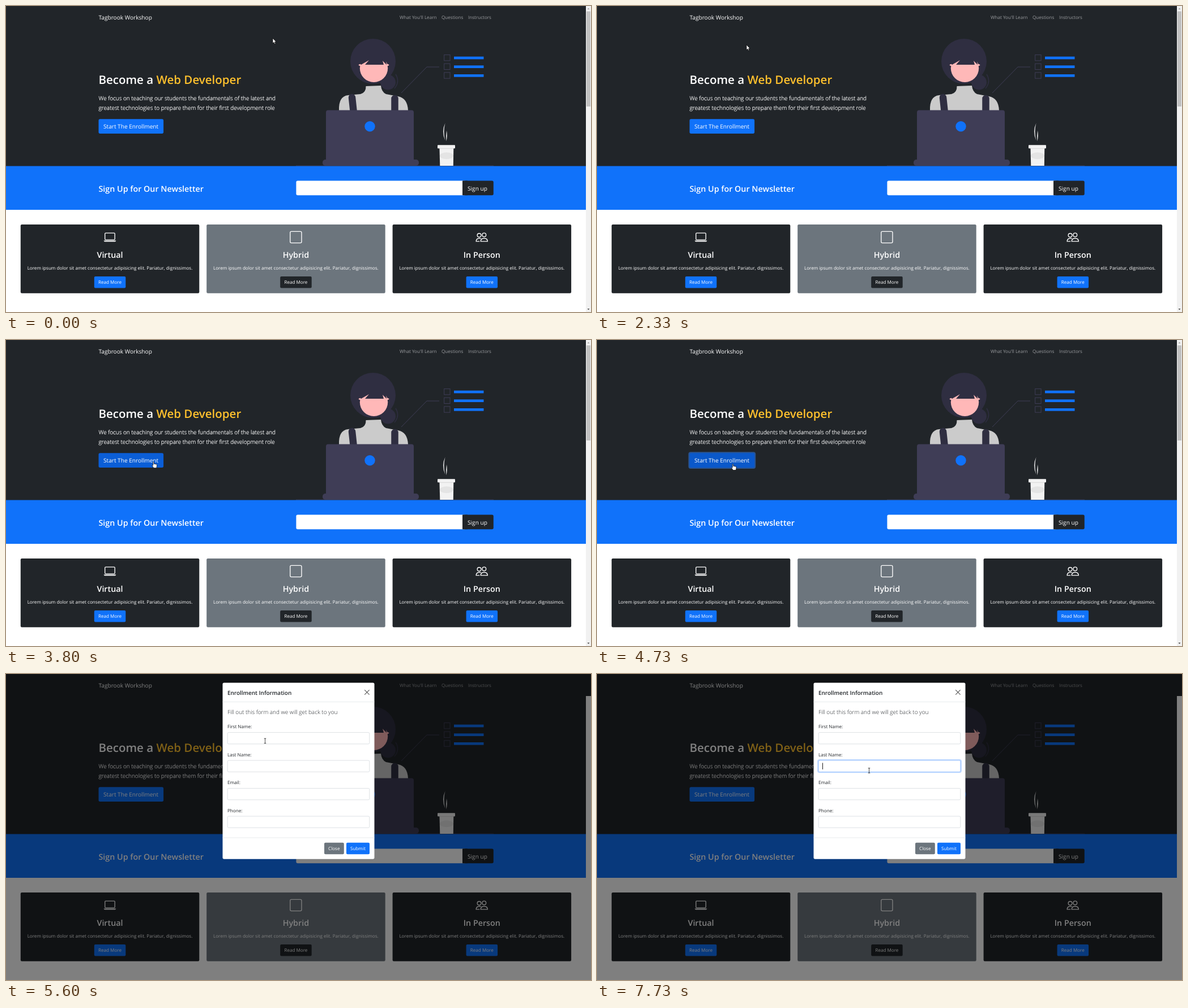
An HTML page for the animation above (8 s loop, 1033 by 542 pixels).

```html
<!DOCTYPE html>
<html lang="en">
<head>
<meta charset="utf-8">
<title>Enrollment page</title>
<style>
  html, body { margin: 0; width: 100%; height: 100%; overflow: hidden; background: #fff; }
  svg { display: block; width: 1033px; height: 542px; font: 8.1px "Open Sans", "Noto Sans", sans-serif; text-rendering: geometricPrecision; }
  .dark { fill: #212529; }
  .blue { fill: #1072fa; }
  .gray { fill: #6c757d; }
  .white { fill: #fff; }
  .navy { fill: #2f2e41; }
  .slate { fill: #3f3d56; }
  .line { fill: none; stroke: #3f3d56; }
  .h1 { font-size: 20.5px; font-weight: 600; }
  .h3 { font-size: 14.3px; font-weight: 600; }
  .h5 { font-size: 9.95px; font-weight: 600; }
  .lead { font-size: 9.98px; font-weight: 300; }
  .bright { stroke: #fff; stroke-width: .2; }
  .large { font-size: 10.13px; }
  .mid { text-anchor: middle; }
  .icon { fill: none; stroke: #fff; }
</style>
</head>
<body>
<svg viewBox="0 0 1033 542">
  <rect class="white" width="1033" height="542"/>
  <rect class="dark" width="1033" height="39"/>
  <rect class="dark" width="1024" height="284"/>
  <text class="white large" x="163.5" y="23.7">Tagbrook Workshop</text>
  <g fill="#9b9da0">
    <text x="695" y="22.6">What You'll Learn</text>
    <text x="769" y="22.6">Questions</text>
    <text x="816" y="22.6">Instructors</text>
  </g>

  <text class="white h1" x="163.5" y="138">Become a <tspan fill="#ffc12d">Web Developer</tspan></text>
  <g class="white lead bright">
    <text x="163.5" y="167.3">We focus on teaching our students the fundamentals of the latest and</text>
    <text x="163.5" y="183.7">greatest technologies to prepare them for their first development role</text>
  </g>
  <rect id="ring" x="161.4" y="198.2" width="118.8" height="29.8" rx="4" fill="#3184fd" opacity=".5"/>
  <rect id="enroll" x="163.5" y="200.3" width="114.6" height="25.6" rx="2.6"/>
  <text class="white large" x="172" y="217.3">Start The Enrollment</text>

  <!-- illustration -->
  <path class="line" d="M512 283H861M698 154L743 108H765"/>
  <circle class="navy" cx="648" cy="98" r="40"/>
  <circle class="navy" cx="674.5" cy="135" r="13.5"/>
  <path d="M688 121Q696 134 686 146" fill="none" stroke="#2f2e41" stroke-width="1.6"/>
  <g fill="#ffb8b8">
    <circle cx="649.5" cy="110.3" r="24.7"/>
    <ellipse cx="649.5" cy="104.5" rx="27" ry="4"/>
  </g>
  <path class="navy" d="M624 101V84H675V102L671 96 672 104 665 97 667 104H634L641 96 627 104Z"/>
  <path fill="#cbcbcb" d="M588 185Q587 160 604 158L626 156Q636 153 635.5 142L662 141Q663 152 671 156L692 160Q709 163 710 185Z"/>
  <path d="M611 162L614 190M686.5 164V190" stroke="#2f2e41" stroke-width="12.5" stroke-linecap="round"/>
  <rect class="slate" x="565" y="184.5" width="155" height="98" rx="4"/>
  <rect class="slate" x="559" y="272" width="170" height="11" rx="5"/>
  <circle class="blue" cx="642.5" cy="213.3" r="9.2"/>
  <g id="tasks"></g>
  <g fill="#f2f2f2">
    <rect x="762" y="246.3" width="31" height="6" rx="1"/>
    <path d="M765.5 252H790.3L789.8 283H766.3Z"/>
    <path d="M775.5 207.5Q768.5 222 775.3 238Q771.5 222 775.5 207.5ZM778 220.5Q779.8 230 777.5 239.5Q776.5 230 778 220.5Z"/>
  </g>
  <path d="M765.5 252.5H790.3" stroke="#ccc" stroke-width=".6"/>
  <ellipse cx="778" cy="265.2" rx="12" ry="6" fill="#e4e4e4"/>

  <!-- newsletter -->
  <rect class="blue" y="283.5" width="1024" height="77.5"/>
  <text class="white h3" x="163.5" y="328.7">Sign Up for Our Newsletter</text>
  <rect class="white" x="512.4" y="309.5" width="300" height="25.7" rx="2.6"/>
  <rect class="dark" x="806" y="309.5" width="54.8" height="25.7" rx="2.6"/>
  <rect class="dark" x="806" y="309.5" width="9" height="25.7"/>
  <text class="white large" x="815" y="326.8">Sign up</text>

  <g id="cards"></g>

  <g id="scrollbar">
    <rect x="1024" width="9" height="542" fill="#f1f1f1"/>
    <rect x="1025" y="9.5" width="7" height="168.5" fill="#c1c1c1"/>
    <path d="M1026.5 6l2-2.5 2 2.5Z" fill="#a3a3a3"/>
    <path d="M1026.5 536l2 2.5 2-2.5Z" fill="#505050"/>
  </g>

  <g id="modal">
    <rect width="1033" height="542" opacity=".5"/>
    <rect class="white" x="382.5" y="15.5" width="268" height="312.2" rx="2.6"/>
    <path d="M382.5 49.4h268M382.5 290h268" stroke="#dee2e6" stroke-width=".7"/>
    <text class="dark h5" x="391" y="36.5">Enrollment Information</text>
    <path d="M633.2 28.2l8.4 8.4m0-8.4l-8.4 8.4" stroke="#555" stroke-width="1.1"/>
    <text class="dark lead" x="391" y="70.7">Fill out this form and we will get back to you</text>
    <g id="fields"></g>
    <rect id="caret" x="398" width=".9" height="11.5"/>
    <rect class="gray" x="562" y="298.7" width="34.8" height="20.6" rx="2.1"/>
    <rect class="blue" x="601" y="298.7" width="41" height="20.6" rx="2.1"/>
    <text class="white mid" x="579.3" y="312">Close</text>
    <text class="white mid" x="621.4" y="312">Submit</text>
  </g>

  <g id="cursor" stroke="#000" stroke-width=".7" fill="#fff">
    <path id="arrow" d="M0 0V9.2L2 7.3 3.5 10.3 5 9.7 3.5 6.7H6.2Z"/>
    <path id="hand" d="M-.8 1Q0-.5 .8 1V4.3L5 5Q6 5 6 6.5 6 10 5 11.6H.3L-2.4 7.5Q-2.5 6-.8 7Z"/>
    <path id="beam" d="M-1.8-4.3H1.8M0-4.3V4.3M-1.8 4.3H1.8"/>
  </g>
</svg>
<script>
const $ = id => document.getElementById(id);
const show = (id, on) => { $(id).style.display = on ? '' : 'none'; };
const repeat = (count, make) => Array.from({ length: count }, (_, i) => make(i)).join('');

$('tasks').innerHTML = repeat(3, i => `
  <rect class="line" x="773.7" y="${86.4 + i * 15.7}" width="10.4" height="10.4"/>
  <rect class="blue" x="791" y="${89.6 + i * 15.7}" width="52.5" height="4.7"/>`);

const cards = [
  ['Virtual', '<rect x="1.5" y="2.5" width="13" height="9" rx="1"/><path d="M0 12.5H16Q16 14 14.5 14H1.5Q0 14 0 12.5Z" fill="#fff" stroke="none"/>'],
  ['Hybrid', '<rect x=".5" y=".5" width="15" height="15" rx="1.5"/>'],
  ['In Person', `<circle cx="11" cy="5" r="2.5"/><circle cx="4.5" cy="5.5" r="2.5"/>
    <path d="M6.5 13.5Q6.5 9.5 11 9.5T15.5 13.5ZM5 13.5H.5Q.5 9.5 5 9.5 6 9.5 6.8 9.8"/>`]
];
$('cards').innerHTML = repeat(cards.length, i => {
  const [name, icon] = cards[i], x = 183.5 + i * 328.4, alt = i === 1;
  return `<rect class="${alt ? 'gray' : 'dark'}" x="${x - 157.7}" y="387" width="315.5" height="121.7" rx="2.2"/>
    <g class="icon" transform="translate(${x - 10.8} 398.7) scale(1.345)">${icon}</g>
    <rect class="${alt ? 'dark' : 'blue'}" x="${x - 27.7}" y="479" width="55.5" height="20.5" rx="2.1"/>
    <g class="white mid">
      <text class="h3" x="${x}" y="445.5">${name}</text>
      <text x="${x}" y="467.2">Lorem ipsum dolor sit amet consectetur adipisicing elit. Pariatur, dignissimos.</text>
      <text x="${x}" y="492.3">Read More</text>
    </g>`;
});

const labels = ['First Name:', 'Last Name:', 'Email:', 'Phone:'];
const fieldTop = i => 103.6 + i * 49.45;
$('fields').innerHTML = repeat(labels.length, i => `
  <text class="dark" x="391" y="${fieldTop(i) - 7.4}">${labels[i]}</text>
  <rect id="glow${i}" x="389" y="${fieldTop(i) - 2}" width="255" height="24.3" rx="4" fill="#c3dbff"/>
  <rect id="field${i}" class="white" x="391.2" y="${fieldTop(i)}" width="250.6" height="20.3" rx="2" stroke-width=".7"/>`);

// Pointer moves: start ms, end ms, and where the pointer comes to rest
const moves = [
  [70, 330, 411, 102],
  [1290, 1560, 522, 52],
  [1560, 2170, 220, 70],
  [2170, 3090, 762, 54],
  [3090, 3900, 239, 222],
  [3930, 4000, 240, 219],
  [4870, 5600, 457.5, 118.5],
  [6670, 7130, 474, 134],
  [7210, 7560, 480.5, 171]
];
const OPEN = 4870, PRESS = 4730, FOCUS = [5800, 7665], BLINK = 530;

function pointerAt(t) {
  let x = 471, y = 57;
  for (const [start, end, toX, toY] of moves) {
    const k = Math.min(1, Math.max(0, (t - start) / (end - start)));
    const ease = k * k * (3 - 2 * k);
    x += (toX - x) * ease;
    y += (toY - y) * ease;
  }
  return [x, y];
}

function draw(t) {
  const [x, y] = pointerAt(t);
  const inside = (left, top, width, height) =>
    x >= left && x <= left + width && y >= top && y <= top + height;
  const open = t >= OPEN, pressed = t >= PRESS && !open;
  const focused = FOCUS.filter(time => t >= time).length - 1;
  const overButton = !open && inside(163.5, 200, 115, 26);
  const overText = open
    ? labels.some((_, i) => inside(391, fieldTop(i), 251, 20.3))
    : inside(163, 157, 314, 30);

  show('modal', open);
  show('scrollbar', !open);
  show('ring', pressed);
  $('enroll').setAttribute('fill', pressed ? '#0a58ca' : overButton ? '#0b5ed7' : '#1072fa');

  labels.forEach((_, i) => {
    show('glow' + i, i === focused);
    $('field' + i).setAttribute('stroke', i === focused ? '#86b7fe' : '#ced4da');
  });
  show('caret', focused >= 0 && Math.floor((t - FOCUS[focused]) / BLINK) % 2 === 0);
  $('caret').setAttribute('y', fieldTop(Math.max(focused, 0)) + 4.4);

  show('hand', overButton);
  show('beam', overText);
  show('arrow', !overButton && !overText);
  $('cursor').setAttribute('transform', `translate(${x} ${y})`);
}

const start = performance.now();
function tick() {
  draw((performance.now() - start) % 8000);
  requestAnimationFrame(tick);
}
tick();
</script>
</body>
</html>
```
